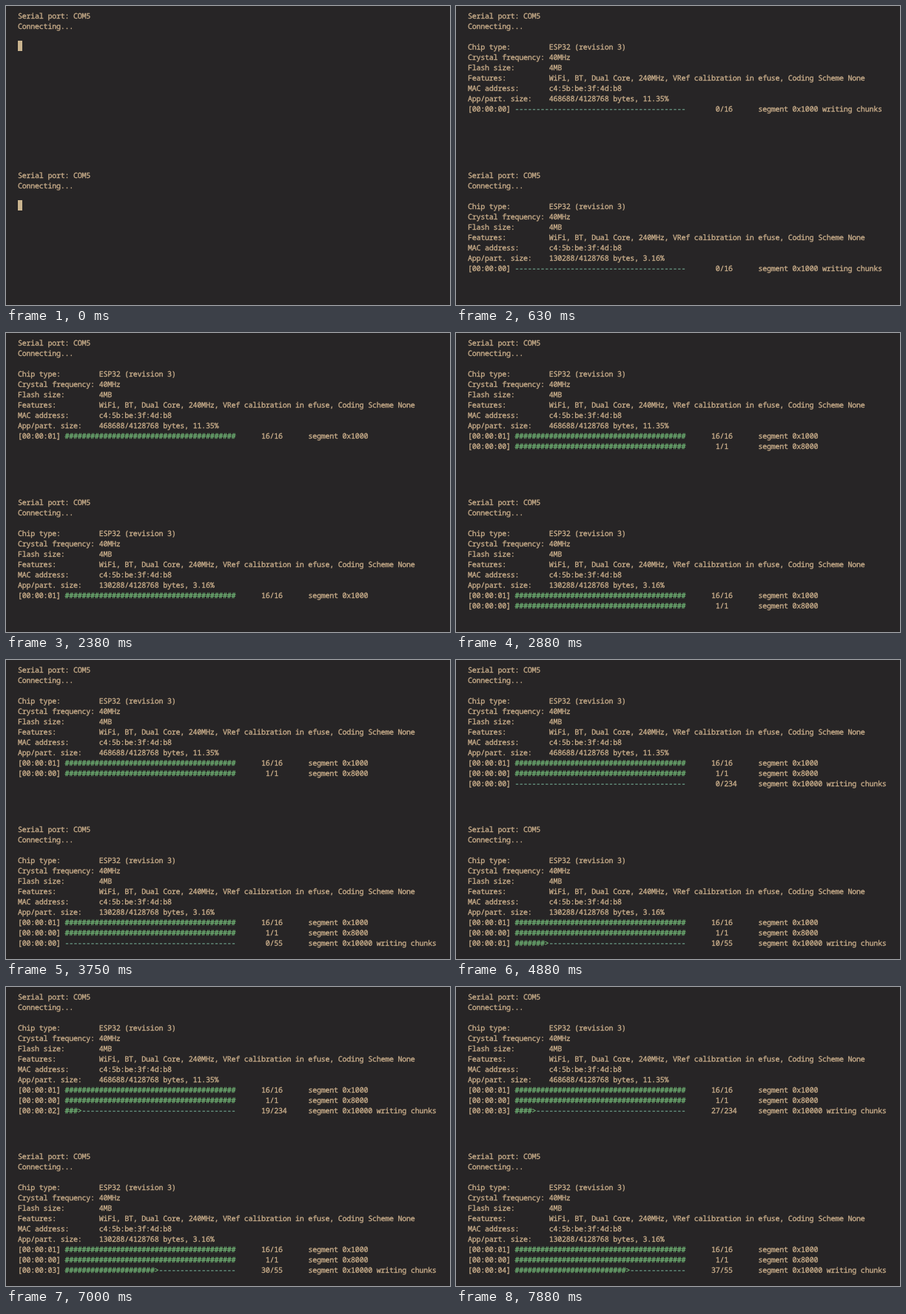
An HTML page that plays this animation: 600 px wide and 405 px high, repeating every 8 s.

```html
<!DOCTYPE html>
<html lang="en">
<head>
<meta charset="utf-8">
<title>Serial flashing</title>
<style>
  html, body { margin: 0; width: 100%; height: 100%; overflow: hidden; background: #272526; }
  #stage { position: relative; width: 600px; height: 405px; overflow: hidden; background: #272526; }
  pre {
    position: absolute; left: 16px; margin: 0; color: #ccb08c;
    font: 500 10px/14px "Noto Sans Mono", "DejaVu Sans Mono", monospace;
    letter-spacing: -0.23px; -webkit-text-stroke: 0.3px;
    text-rendering: geometricPrecision; font-variant-ligatures: none;
  }
  #top { top: 6px; }
  #bottom { top: 222px; }
  .done { color: #72b877; }
  .todo { color: #72a890; }
  .cursor { display: inline-block; width: 6px; height: 14px; margin-top: -1px; background: #cab48f; vertical-align: top; }
</style>
</head>
<body>
<div id="stage">
  <pre id="top"></pre>
  <pre id="bottom"></pre>
</div>
<script>
  const LOOP = 8000, STEP = 125, RATE = 9, WIDTH = 40;
  const INFO_AT = 250;

  // at: row appears, from: first chunk starts, both in ms
  const boot = { at: 500, from: 530, total: 16, name: "0x1000" };
  const table = { at: 2500, from: 2300, total: 1, name: "0x8000" };
  const panes = [
    { id: "top", size: "468688/4128768 bytes, 11.35%",
      segments: [boot, table, { at: 4750, from: 4833, total: 234, name: "0x10000" }] },
    { id: "bottom", size: "130288/4128768 bytes, 3.16%",
      segments: [boot, table, { at: 3750, from: 3663, total: 55, name: "0x10000" }] }
  ];

  const field = (label, value) => (label + ":").padEnd(19) + value;

  const info = size => [
    field("Chip type", "ESP32 (revision 3)"),
    field("Crystal frequency", "40MHz"),
    field("Flash size", "4MB"),
    field("Features", "WiFi, BT, Dual Core, 240MHz, VRef calibration in efuse, Coding Scheme None"),
    field("MAC address", "c4:5b:be:3f:4d:b8"),
    field("App/part. size", size)
  ];

  function bar(count, total) {
    const full = Math.floor(count / total * WIDTH);
    const head = count > 0 && full < WIDTH ? "&gt;" : "";
    const rest = WIDTH - full - (head ? 1 : 0);
    return `<span class="done">${"#".repeat(full)}${head}</span><span class="todo">${"-".repeat(rest)}</span>`;
  }

  function segmentRow({ at, from, total, name }, t) {
    const chunks = Math.floor(RATE * (t - from) / 1000);
    const count = Math.max(0, Math.min(total, chunks));
    const end = Math.min(t, from + total * 1000 / RATE);
    const secs = String(Math.max(0, Math.floor((end - at) / 1000))).padStart(2, "0");
    const tally = String(count).padStart(7) + "/" + String(total).padEnd(7);
    const note = count < total ? " writing chunks" : "";
    return `[00:00:${secs}] ${bar(count, total)} ${tally} segment ${name}${note}`;
  }

  function paneText({ size, segments }, t) {
    const rows = ["Serial port: COM5", "Connecting...", ""];
    if (t < INFO_AT) rows.push('<span class="cursor"></span>');
    else rows.push(...info(size));
    for (const s of segments) if (t >= s.at) rows.push(segmentRow(s, t));
    return rows.join("\n");
  }

  let shown = -1;
  function draw() {
    const t = Math.floor(performance.now() % LOOP / STEP) * STEP;
    if (t !== shown) {
      shown = t;
      for (const p of panes) document.getElementById(p.id).innerHTML = paneText(p, t);
    }
    requestAnimationFrame(draw);
  }
  draw();
</script>
</body>
</html>
```
